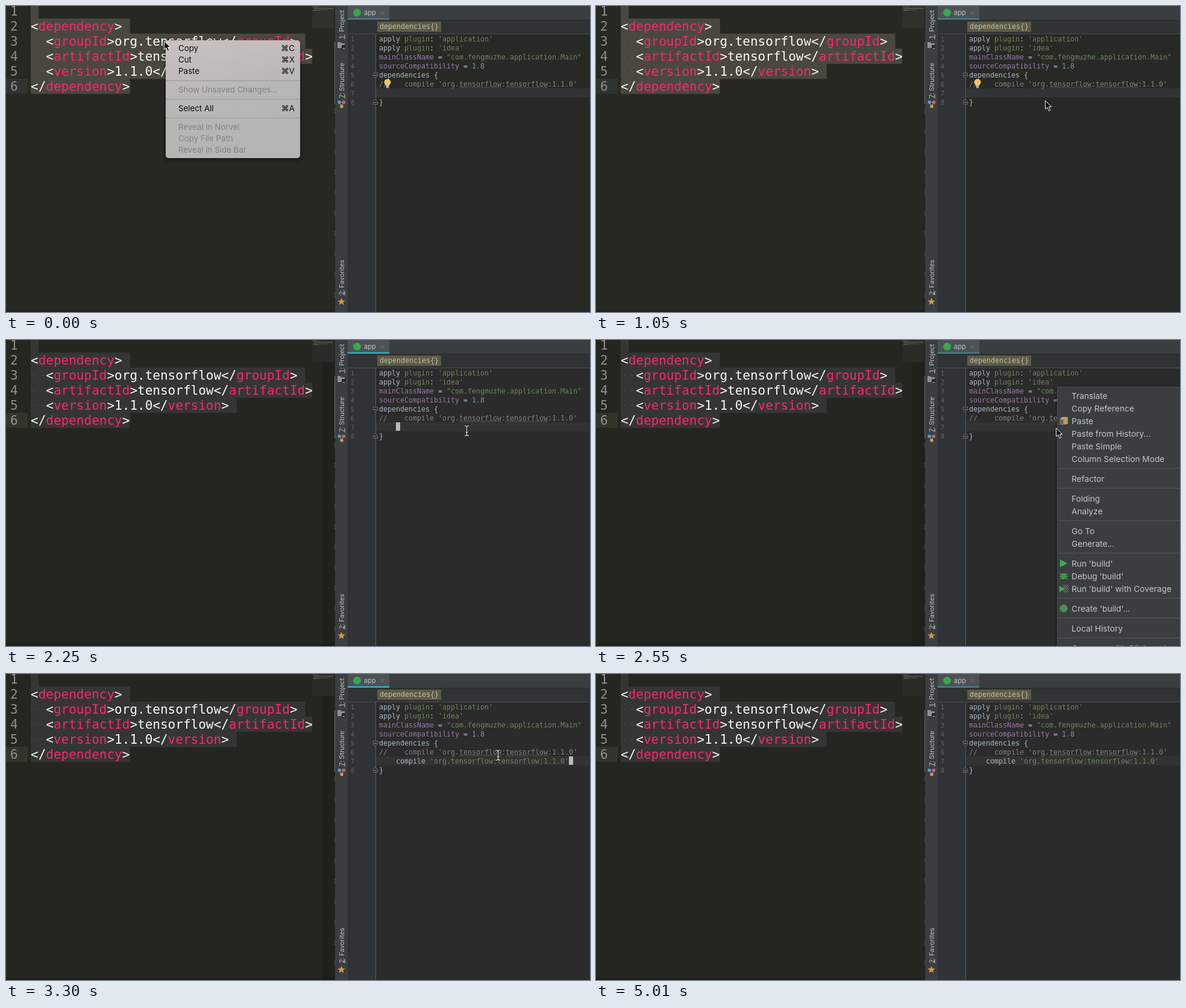
Animation of 969x509 px, one loop 5.11 s. Source, as an HTML page:

```html
<!DOCTYPE html>
<html lang="en">
<head>
<meta charset="utf-8">
<title>Paste a dependency</title>
<style>
html, body { margin: 0; width: 100%; height: 100%; overflow: hidden; background: #272822; }
svg { display: block; width: 969px; height: 509px;
  --left: #272822; --sel: #49483e; --gutter: #2f3432; --map: #31302a; --edge: #272822;
  --code: #282925; --row: #323336; --tab: #467683; }
svg.ide { --left: #25261f; --sel: #353633; --gutter: #34352a; --map: #2b2c28; --edge: #20211b;
  --code: #2b2b2b; --row: #323232; }
svg.live { --tab: #3a9db6; }
svg.done { --edge: #25261f; }
text { white-space: pre; }
.xml { font: 21px "DejaVu Sans Mono", monospace; }
.map { font: 1.6px "DejaVu Sans Mono", monospace; }
.code { font: 11.63px "DejaVu Sans Mono", monospace; }
.num { font: 10px "DejaVu Sans Mono", monospace; }
.side { font: 11.5px Roboto, sans-serif; }
.tab { font: 11px Inter, sans-serif; }
.menu { font: 13.3px Inter, sans-serif; }
.pop { font: 13.7px Inter, sans-serif; }
</style>
</head>
<body>
<svg id="stage" viewBox="0 0 969 509" xmlns="http://www.w3.org/2000/svg">
  <defs>
    <linearGradient id="glass" x1="0" y1="0" x2="0.25" y2="1">
      <stop offset="0" stop-color="#cbc0c1"/>
      <stop offset="0.38" stop-color="#bdbab8"/>
      <stop offset="0.55" stop-color="#b7b8b4"/>
      <stop offset="1" stop-color="#b5b6b2"/>
    </linearGradient>
    <filter id="shadow" x="-20%" y="-20%" width="140%" height="140%">
      <feDropShadow dx="0" dy="3" stdDeviation="5" flood-color="#000" flood-opacity="0.45"/>
    </filter>
  </defs>
</svg>
<script>
const LOOP = 5110;
const svg = document.getElementById('stage');

function add(parent, tag, attrs = {}) {
  const el = document.createElementNS(svg.namespaceURI, tag);
  for (const k in attrs) el.setAttribute(k, attrs[k]);
  return parent.appendChild(el);
}
const group = (parent = svg) => add(parent, 'g');
const rect = (p, x, y, width, height, fill, extra) => add(p, 'rect', { x, y, width, height, fill, ...extra });
const path = (p, d, fill, extra) => add(p, 'path', { d, fill, ...extra });
const dot = (p, cx, cy, r, fill) => add(p, 'circle', { cx, cy, r, fill });
function text(p, cls, x, y, str, fill, extra) {
  const el = add(p, 'text', { class: cls, x, y, fill, ...extra });
  el.textContent = str;
  return el;
}
// runs: [text, colour] pairs set one after the other
function rich(p, cls, x, y, runs) {
  const el = add(p, 'text', { class: cls, x, y });
  for (const [str, fill] of runs) add(el, 'tspan', { fill }).textContent = str;
}

// Parts that are visible only during [from, to) spans
const timed = [];
function during(el, ...spans) {
  timed.push([el, spans]);
  return el;
}
const within = (t, spans) => spans.some(([a, b]) => t >= a && t < b);

const XML = [
  '',
  '<dependency>',
  '  <groupId>org.tensorflow</groupId>',
  '  <artifactId>tensorflow</artifactId>',
  '  <version>1.1.0</version>',
  '</dependency>'
];

function drawXml() {
  const g = group(), cw = 12.64;
  rect(g, 0, 0, 546, 509, 'var(--left)');
  rect(g, 0, 121, 36, 25, 'var(--gutter)');
  XML.forEach((line, i) => {
    const y = 16 + 25 * i;
    const cols = line.length + (i < 5 ? 1 : 0);
    rect(g, 41, y - 20, cols * cw + 0.5, 25.3, 'var(--sel)', { rx: 2 });
    text(g, 'xml', 7, y, i + 1, '#8f908a');
    const runs = line.split(/(?<=<\/?)(\w+)(?=>)/).map((s, k) => [s, k % 2 ? '#f92672' : '#f8f8f2']);
    rich(g, 'xml', 41, y, runs);
    if (line[0] === ' ') for (const x of [47, 60]) dot(g, x, y - 7, 0.8, '#6b6a5f');
  });
  rect(g, 508, 0, 38, 509, 'var(--left)');
  rect(g, 525, 0, 21, 509, 'var(--edge)');
  rect(g, 508, 0, 38, 37, 'var(--map)');
  XML.slice(1).forEach((line, i) => text(g, 'map', 508.5, 2 + 1.6 * i, line, '#b5b3a8'));
  rect(g, 0, 505, 546, 4, '#000', { opacity: 0.15 });
}

function drawSidebar() {
  const g = group();
  rect(g, 546, 0, 21, 509, '#3b3e40');
  rect(g, 545, 0, 1, 509, '#20211e');
  rect(g, 545, 60, 1, 103, '#74636a');
  for (let y = 174; y < 500; y += 34)
    for (let k = -3; k <= 3; k += 3) rect(g, 545, y + k, 1, 1, '#85878a');
  for (const [label, y] of [['1: Project', 55], ['7: Structure', 153.5], ['2: Favorites', 481]]) {
    const el = text(g, 'side', 0, 0, '', '#bcbec0', { transform: `translate(560.5 ${y}) rotate(-90)` });
    add(el, 'tspan', { 'text-decoration': 'underline' }).textContent = label[0];
    add(el, 'tspan').textContent = label.slice(1);
  }
  path(g, 'M550 60h5l1 2h6v8h-12z', '#8e9296');
  rect(g, 557, 65, 6, 6, '#26282a');
  rect(g, 559, 70, 3, 1, '#c8cacc');
  path(g, 'M553 160H560L557 167Z', 'none', { stroke: '#9a9da0' });
  dot(g, 553, 160, 2.7, '#4d9fd6');
  dot(g, 560.5, 160, 2.7, '#d9605c');
  dot(g, 557, 167, 2.7, '#d99a4e');
  const star = [...Array(10).keys()].map(k => {
    const r = k % 2 ? 2.8 : 6.6, a = k * Math.PI / 5;
    return [556.5 + r * Math.sin(a), 492 - r * Math.cos(a)];
  });
  add(g, 'polygon', { points: star.join(' '), fill: '#d6983f' });
}

const PLAIN = '#a9b7c6', STR = '#6a8759', PROP = '#9876aa', NUM = '#6897bb', NOTE = '#808080';
const CODE = [
  [['apply ', PLAIN], ['plugin', STR], [': ', PLAIN], ["'application'", STR]],
  [['apply ', PLAIN], ['plugin', STR], [': ', PLAIN], ["'idea'", STR]],
  [['mainClassName', PROP], [' = ', PLAIN], ['"com.fengmuzhe.application.Main"', STR]],
  [['sourceCompatibility', PROP], [' = ', PLAIN], ['1.8', NUM]],
  [['dependencies {', PLAIN]],
  [["//    compile 'org.tensorflow:tensorflow:1.1.0'", NOTE]],
  [],
  [['}', PLAIN]]
];
const PASTED = [['    compile ', PLAIN], ["'org.tensorflow:tensorflow:1.1.0'", STR]];

function wave(p, x, y, w) {
  let d = `M${x} ${y}`;
  for (let k = 2; k <= w; k += 2) d += `l2 ${k % 4 ? -2 : 2}`;
  path(p, d, 'none', { stroke: '#5f8552', 'stroke-width': 0.8 });
}

function drawIde() {
  const g = group();
  rect(g, 567, 0, 402, 509, 'var(--code)');
  rect(g, 567, 0, 402, 23, '#3b3e40');
  rect(g, 567, 0, 69, 23, '#4d5153');
  rect(g, 567, 20, 69, 3, 'var(--tab)');
  dot(g, 582.5, 11, 6.5, '#36a852');
  text(g, 'tab', 594, 15, 'app', '#c0c3c5');
  path(g, 'M621.5 8.5l6 6m0-6l-6 6', 'none', { stroke: '#7b7f82' });
  rect(g, 567, 23, 402, 23, '#303335');
  rect(g, 567, 23, 402, 1, '#292b2c');
  rect(g, 567, 46, 402, 1, '#4b4e50');
  rect(g, 567, 47, 46, 462, '#303335');

  const crumb = during(group(g), [0, 1800], [2250, LOOP]);
  rect(crumb, 616, 26, 106, 17, '#5d5b43');
  text(crumb, 'code', 620, 38, 'dependencies{}', '#bcbfba');

  during(rect(g, 614, 137, 355, 15, 'var(--row)'), [0, 1650], [2100, LOOP]);
  during(rect(g, 614, 152, 355, 15, 'var(--row)'), [1650, 2100]);
  const match = during(group(g), [1950, 2100]);
  rect(match, 710, 107, 7, 15, '#3b514d');
  rect(match, 619, 152, 7, 15, '#3b514d');

  rect(g, 613, 47, 1, 462, '#5a5d5f');
  path(g, 'M609.5 111.5h7v5l-3.5 3.5l-3.5-3.5z', '#303335', { stroke: '#686b6d' });
  path(g, 'M609.5 163.5h7v-5l-3.5-3.5l-3.5 3.5z', '#303335', { stroke: '#686b6d' });
  path(g, 'M611 115.5h4M611 160.5h4', 'none', { stroke: '#8a8d8f' });

  CODE.forEach((runs, i) => {
    text(g, 'num', 572, 58.7 + 15 * i, i + 1, '#63676b');
    rich(g, 'code', 619, 59 + 15 * i, runs);
  });
  wave(g, 752, 136.5, 70);
  wave(g, 829, 136.5, 70);
  rich(during(group(g), [3300, LOOP]), 'code', 619, 149, PASTED);

  const bulb = during(group(g), [0, 1350]);
  path(bulb, 'M630.5 133c0-2-3-3-3-6.5a5.5 5 0 0 1 11 0c0 3.500-3 4.500-3 6.500z', '#f2c55c');
  rect(bulb, 630.5, 133, 5, 3.5, '#a9abad', { rx: 1 });

  const caret = (x, y, ...spans) => during(rect(g, x, y, 7, 14, '#b9bbbb'), ...spans);
  caret(626, 152, [1650, 2100]);
  caret(647, 137, [2100, 2550]);
  caret(934, 137, [3300, 5010]);
}

function drawCopyMenu() {
  const g = during(group(), [0, 1050]);
  rect(g, 265, 57, 223, 196, 'url(#glass)', { rx: 5, filter: 'url(#shadow)' });
  for (const y of [124, 155, 186]) rect(g, 265, y - 0.5, 223, 1.5, '#a1a19f');
  const item = (p, y, label, key, fill) => {
    text(p, 'menu', 286, y + 4.8, label, fill);
    if (key) text(p, 'menu', 479, y + 4.8, '⌘' + key, fill, { 'text-anchor': 'end' });
  };
  const rows = [
    [70, 'Copy', 'C'], [89, 'Cut', 'X'], [108, 'Paste', 'V'], [139, 'Show Unsaved Changes...'],
    [170, 'Select All', 'A'], [201, 'Reveal in Norvel'], [220, 'Copy File Path'], [239, 'Reveal in Side Bar']
  ];
  for (const [y, label, key] of rows) item(g, y, label, key, key ? '#0c0c0c' : '#828381');
  const hot = during(group(g), [300, 750]);
  rect(hot, 265, 61, 223, 19, '#3069dc');
  item(hot, 70, 'Copy', 'C', '#fff');
  return g;
}

function drawPopup() {
  const g = during(group(), [2550, 3300]);
  rect(g, 762, 79, 3, 430, '#000', { opacity: 0.18 });
  rect(g, 765, 78, 204, 431, '#3b3e40');
  rect(g, 765, 78, 204, 1, '#4b4e50');
  rect(g, 765, 78, 1, 431, '#4b4e50');
  const hot = during(rect(g, 765, 124, 204, 21, '#235fd0'), [3000, 3300]);
  // Each block is a run of rows, 21px apart, closed by a separator
  const blocks = [
    ['Translate', 'Copy Reference', 'Paste', 'Paste from History...', 'Paste Simple', 'Column Selection Mode'],
    ['Refactor'], ['Folding', 'Analyze'], ['Go To', 'Generate...'],
    ["Run 'build'", "Debug 'build'", "Run 'build' with Coverage"],
    ["Create 'build'..."], ['Local History'], ['Compare with Clipboard']
  ];
  let y = 93;
  for (const block of blocks) {
    for (const label of block) {
      text(g, 'pop', 789, y + 5, label, '#c3c5c7');
      y += 21;
    }
    rect(g, 765, y - 6, 204, 1, '#54575a');
    y += 12;
  }
  during(text(g, 'pop', 789, 140, 'Paste', '#fff'), [3000, 3300]);

  rect(g, 769.5, 130, 9, 11, '#9a7442');
  rect(g, 772, 128.5, 4, 3, '#b9bcbf');
  rect(g, 775, 128, 8, 12, '#c39a5c');
  rect(g, 770.5, 133, 5, 7, '#566579');
  path(g, 'M770 365l12 6.500l-12 6.500z', '#3fae55');

  add(g, 'ellipse', { cx: 776, cy: 393, rx: 4, ry: 5, fill: '#45a857' });
  path(g, 'M770 388l12 10M770 398l12-10M769 393h14', 'none', { stroke: '#45a857', 'stroke-width': 1.3 });
  rect(g, 773.5, 391, 5, 1, '#2d6138');
  rect(g, 773.5, 394, 5, 1, '#2d6138');

  path(g, 'M769 408.500l8 5.500l-8 5.500z', '#45a857');
  for (let k = 0; k < 18; k++)
    rect(g, 775 + (k % 3) * 3 + (k / 3 & 1) * 1.5, 407 + (k / 3 | 0) * 2.2, 1.5, 1.5, '#858a8d');
  dot(g, 776, 446.5, 6.5, '#4a8f50');
}

function drawCursors() {
  const arrow = group();
  path(arrow, 'M.5 .5V14.500L3.800 11.500L6.200 17.300L8.700 16.200L6.300 10.600H10.700Z', '#0a0a0a',
    { stroke: '#f4f4f4', 'stroke-width': 1, 'stroke-linejoin': 'round' });
  const beam = group();
  const d = 'M-3.500 -8.500Q-.5 -8.500 0 -6.500Q.5 -8.500 3.500 -8.500M0 -7V7M-3.500 8.500Q-.5 8.500 0 6.500Q.5 8.500 3.500 8.500M-2 2.500H2';
  path(beam, d, 'none', { stroke: '#111', 'stroke-width': 3 });
  path(beam, d, 'none', { stroke: '#f0f0f0', 'stroke-width': 1.2 });
  return { arrow, beam };
}

// time, pointer, x, y
const STEPS = [
  [0, 'arrow', 262, 58],
  [300, 'arrow', 287, 77],
  [450, 'arrow', 290, 78],
  [600, 'arrow', 297, 75],
  [1050, 'arrow', 745, 157],
  [1200, 'arrow', 752, 156],
  [1350, 'beam', 764.5, 156],
  [1650, 'beam', 764, 157],
  [1800, 'beam', 763.5, 155],
  [1950, 'beam', 764.5, 151],
  [2550, 'arrow', 763, 146],
  [2850, 'arrow', 790, 147],
  [3000, 'arrow', 813, 131],
  [3150, 'arrow', 815, 131],
  [3300, 'beam', 816.5, 135],
  [4050, 'beam', 766.5, 254.5],
  [4200, 'beam', 839.5, 366.5],
  [4350, 'beam', 851.5, 384.5],
  [4500, 'none', 0, 0]
];

drawXml();
drawSidebar();
drawIde();
const copyMenu = drawCopyMenu();
drawPopup();
const cursors = drawCursors();

function render(t) {
  svg.classList.toggle('ide', t >= 1500);
  svg.classList.toggle('live', within(t, [[1650, 2550], [3300, 5010]]));
  svg.classList.toggle('done', t >= 5010);
  for (const [el, spans] of timed) el.style.display = within(t, spans) ? '' : 'none';
  copyMenu.style.opacity = t < 900 ? 1 : 0.45;
  const [, kind, x, y] = STEPS.findLast(step => step[0] <= t);
  for (const name in cursors) {
    cursors[name].style.display = name === kind ? '' : 'none';
    cursors[name].setAttribute('transform', `translate(${x} ${y})`);
  }
}

const start = performance.now();
function tick() {
  render((performance.now() - start) % LOOP);
  requestAnimationFrame(tick);
}
tick();
</script>
</body>
</html>
```
